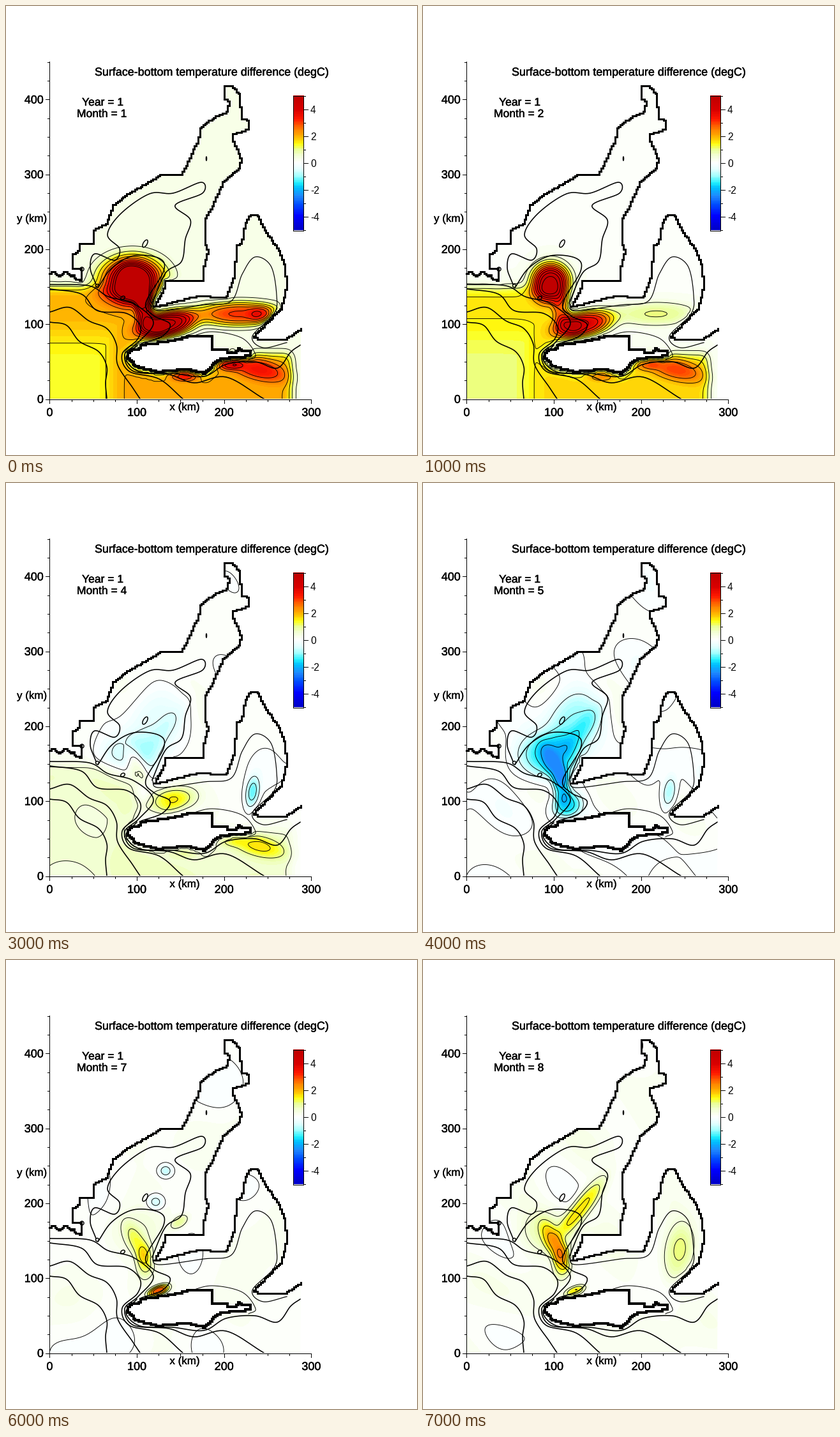
Recreate the animation shown at these times as a matplotlib script. Size 644 by 703 pixels, loop 8 s.

```python
import matplotlib.pyplot as plt
import numpy as np
from matplotlib.animation import FuncAnimation
from matplotlib.colors import LinearSegmentedColormap
from matplotlib.patches import Ellipse, Polygon
from matplotlib.patheffects import Normal, Stroke

W, H, DPI = 644, 703, 100
PT = 72 / DPI
LEFT, BASE = 68.5, 615.5
KX, KY = 410 / 300, 469 / 400          # pixels per km
plt.rcParams["font.family"] = "Liberation Sans"

# ---- key points of the coast, in stage pixels ----
SHELF_COAST = [(x, 419.5 + 4 * np.sin(x / 3.1)) for x in range(69, 108, 3)]
SHELF_COAST += [(109, 428), (118, 430), (118, 411)]
GULF_COAST = [(103, 411), (103, 390), (115, 383), (115, 372), (137, 372),
              (137, 350), (158, 341), (168, 311), (190, 295), (243, 264),
              (276, 263), (286, 242), (302, 208), (303, 191), (327, 174),
              (348, 165), (349, 150), (341, 143), (341, 125), (354, 125),
              (365, 137), (370, 176), (381, 179), (381, 193), (356, 201),
              (356, 212), (369, 240), (366, 254), (340, 277), (325, 311),
              (313, 333), (313, 375), (317, 385), (310, 408), (309, 431),
              (248, 431), (248, 442), (233, 471)]
EAST_COAST = [(246, 468), (271, 461), (301, 454), (345, 456), (357, 425),
              (362, 375), (370, 370), (372, 351), (378, 333), (383, 327),
              (393, 327), (409, 356), (428, 384), (438, 410), (440, 441),
              (431, 474), (388, 518), (393, 521), (440, 521), (461, 506)]
ISLAND = [(193, 540), (211, 536), (211, 531), (250, 526), (290, 517), (322, 516),
          (323, 537), (347, 537), (349, 543), (361, 543), (364, 536), (370, 541),
          (382, 541), (384, 548), (340, 552), (330, 556), (318, 570), (311, 575),
          (283, 568), (240, 573), (204, 564), (192, 550), (193, 540)]

# ---- patches of water: x, y, two radii, tilt, {month: strength} ----
GULF_PATCHES = [
    (200, 432, 29, 29, 0, {1: 2.4, 2: 5}),                           # mouth
    (198, 428, 50, 36, 0, {1: 4.2, 5: -1.7, 7: 0.3, 8: 0.6}),
    (207, 446, 38, 14, 62, {1: 1, 3: 2.6, 5: -1, 7: 0.8, 8: 1.4}),
    (217, 474, 14, 26, 0, {1: 3.2, 2: 2, 3: 0.8, 5: -1.4, 7: 0.9, 8: 1.2}),
    (250, 385, 52, 14, -52, {5: -0.4, 8: 1.5}),                      # upper arm
    (240, 370, 50, 42, -50, {5: -1}),
    (272, 410, 16, 9, -35, {7: 0.9}),
    (250, 330, 11, 10, 0, {7: -0.8}),
    (234, 379, 13, 12, 0, {7: -0.8}),
    (386, 485, 11, 26, 8, {3: -1.5, 5: -0.9}),                       # east gulf
    (400, 460, 24, 46, 10, {3: -0.3, 8: 0.9})]
STRAIT_PATCHES = [
    (254, 498, 42, 20, -12, {1: 4.8, 2: 3.8, 3: 3}),
    (226, 505, 24, 20, -30, {1: 1.5, 2: 1.5, 3: 0.8, 5: -1.6}),
    (238, 519, 18, 8, -25, {7: 3, 8: 1.6}),
    (365, 482, 70, 19, 0, {1: 2.8, 2: 0.9}),
    (400, 483, 19, 13, 0, {1: 0.9}),
    (395, 568, 45, 17, 15, {1: 1.4, 2: 1.3, 3: 2}),                  # south shelf
    (350, 560, 20, 10, 0, {1: 1.7, 2: 0.9, 3: 0.8}),
    (280, 578, 22, 9, 0, {1: 1.5, 2: 0.8, 3: 0.8})]

# month: background, open ocean, rise towards the shelf, south shelf
WATER = {1: (0.25, 1.05, 0.7, 1.8), 2: (0.12, 0.95, 0.5, 1.55),
         3: (0.12, 0.85, 0.25, 1.05), 5: (0.03, 0, 0, 0),
         7: (0.1, 0, 0, 0), 8: (0.12, 0, 0, 0)}

STOPS = [(-5, "#0000c8"), (-4, "#0000ff"), (-3.1, "#0050ff"), (-2.5, "#2088ff"),
         (-1.9, "#00bfff"), (-1.5, "#20f0ff"), (-1, "#a0ffff"), (-0.5, "#e4ffff"),
         (0, "#ffffff"), (0.5, "#f4ffdc"), (1, "#eaff98"), (1.4, "#ffff10"),
         (2, "#ffb000"), (2.5, "#ff8000"), (3.3, "#ff1800"), (4, "#d80000"),
         (5, "#c00000")]
cmap = LinearSegmentedColormap.from_list(
    "diff", [((v + 5) / 10, c) for v, c in STOPS], N=80)


def stair(pts):
    """Follow the points along the edges of the 2 km model cells."""
    cx, cy = 2 * KX, 2 * KY
    out = []
    for a, b in zip(pts, pts[1:]):
        n = int(max(abs(b[0] - a[0]), abs(b[1] - a[1]))) + 1
        for t in np.linspace(0, 1, n):
            x = LEFT + round((a[0] + t * (b[0] - a[0]) - LEFT) / cx) * cx
            y = BASE + round((a[1] + t * (b[1] - a[1]) - BASE) / cy) * cy
            if out and x != out[-1][0] and y != out[-1][1]:
                out.append((x, out[-1][1]))
            if not out or (x, y) != out[-1]:
                out.append((x, y))
    return out


def smooth(pts):
    """Catmull-Rom curve through the points."""
    p = np.array(pts, float)
    p = np.vstack([2 * p[0] - p[1], p, 2 * p[-1] - p[-2]])
    t = np.linspace(0, 1, 12)[:, None]
    return np.vstack([
        b + t / 2 * (c - a + t * (2 * a - 5 * b + 4 * c - d
                                  + t * (3 * (b - c) + d - a)))
        for a, b, c, d in zip(p, p[1:], p[2:], p[3:])])


shore = stair(SHELF_COAST + GULF_COAST + EAST_COAST)
island = stair(ISLAND)

# ---- temperature difference on a grid ----
XS, YS = np.arange(69, 463, 2.0), np.arange(120, 618, 2.0)
X, Y = np.meshgrid(XS, YS)
coast_dist = np.full(X.shape, 1e3)
for px, py in shore + island:
    coast_dist = np.minimum(coast_dist, np.hypot(X - px, Y - py))
near_coast = 1 - np.exp(-coast_dist / 4)


def step(d):
    return 0.5 + 0.5 * np.tanh(d / 2)


def patch(x, y, rx, ry, tilt):
    a = np.radians(tilt)
    u = (X - x) * np.cos(a) + (Y - y) * np.sin(a)
    v = (Y - y) * np.cos(a) - (X - x) * np.sin(a)
    return np.exp(-((u / rx) ** 2 + (v / ry) ** 2) ** 1.4)


def ripple(month):
    """Weak large-scale waviness that bends the zero lines."""
    rng = np.random.default_rng(month)
    total = 0
    for _ in range(5):
        a, phase = rng.uniform(0, 2 * np.pi, 2)
        k = 2 * np.pi / rng.uniform(90, 190)
        total = total + np.sin(k * (X * np.cos(a) + Y * np.sin(a)) + phase)
    return 0.05 * total


def field(month):
    tint, ocean, rise, south = WATER[month]
    shelf = np.maximum(step((515 - Y) / 14), step((X - 165) / 8))
    east = step((X - 185) / 9)
    open_sea = (ocean + rise * shelf) * (1 - east) + south * east
    mask = np.maximum(step((Y - 440) / 5) * step((208 - X) / 6),
                      step((Y - 545) / 5) * step((447 - X) / 4))
    f = open_sea * mask
    for *shape, strength in GULF_PATCHES + STRAIT_PATCHES:
        if month in strength:
            f = f + strength[month] * patch(*shape)
    return np.clip(f, -2.45, 5.4) * near_coast + tint + ripple(month) * (month > 3)


fields = {m: field(m) for m in WATER}
fields[4] = (fields[3] + fields[5]) / 2
fields[6] = (fields[5] + fields[7]) / 2

# ---- fixed parts ----
fig = plt.figure(figsize=(W / DPI, H / DPI), dpi=DPI, facecolor="white")
ax = fig.add_axes([0, 0, 1, 1])
ax.set(xlim=(0, W), ylim=(H, 0))
ax.axis("off")
ax.autoscale(False)


def curve(pts, px=1.6):
    x, y = smooth(pts).T
    ax.plot(x, y, color="black", lw=px * PT, zorder=4, clip_path=sea)


def seg(x0, y0, x1, y1):
    ax.plot([x0, x1], [y0, y1], color="black", lw=PT, zorder=8, aa=False)


def label(x, y, s, px=18, ha="left", bold=0.45):
    fx = [Stroke(linewidth=bold * PT, foreground="black"), Normal()]
    return ax.text(x, y, s, fontsize=px * PT, ha=ha, va="baseline", zorder=9,
                   path_effects=fx if bold else None)


sea = Polygon(shore + [(461, 615), (69, 615)], fc="none", ec="none")
ax.add_patch(sea)
ax.plot(*zip(*shore), color="black", lw=2.6 * PT, zorder=6, aa=False)
ax.add_patch(Polygon(island, fc="white", ec="black", lw=2.3 * PT, zorder=6,
                     aa=False))

# depth lines, from the open ocean inwards
curve([(69, 495), (95, 500), (115, 525), (145, 541), (158, 565), (156, 590),
       (158, 615)])
curve([(69, 479), (100, 472), (130, 493), (158, 505), (173, 530), (175, 562),
       (198, 597), (210, 615)])
curve([(69, 443), (118, 451), (143, 477), (188, 481), (210, 500), (206, 522),
       (182, 545), (193, 572), (240, 584), (277, 615)])
curve([(69, 436), (130, 438), (160, 455), (200, 466), (231, 495), (208, 526),
       (186, 546), (200, 572), (255, 577), (295, 590), (345, 581), (404, 615)])
curve([(205, 531), (188, 552), (210, 573), (260, 575), (310, 580), (345, 561),
       (390, 557), (425, 567), (446, 542), (461, 531)])
curve([(144, 441), (166, 410), (200, 391), (240, 395), (247, 415), (219, 465),
       (232, 485), (257, 498), (245, 517), (212, 529)])
curve([(141, 436), (132, 410), (139, 388), (170, 398), (178, 380), (159, 358),
       (180, 325), (225, 294), (262, 293), (306, 276), (308, 293), (265, 312),
       (289, 335), (281, 365), (275, 400), (250, 418), (229, 465)])
curve([(229, 465), (240, 477), (310, 468), (353, 462), (370, 420), (390, 393),
       (415, 407), (424, 452), (420, 482), (386, 517), (403, 535), (440, 527)], 1.2)
curve([(285, 519), (323, 510), (370, 520), (391, 546), (380, 554)], 1)
for x, y, w, h, tilt in [(218, 372, 6, 13, 30), (183, 457, 7, 5, -30),
                         (119, 412, 6, 6, 0), (143, 438, 5, 5, 0),
                         (314, 239, 1, 6, 0)]:
    ax.add_patch(Ellipse((x, y), w, h, angle=tilt, fc="none", ec="black",
                         lw=1.5 * PT, zorder=7))

# axes
seg(LEFT, 87, LEFT, BASE)
seg(LEFT, BASE, 478, BASE)
for km in range(0, 451, 25):
    size = 3 if km % 100 else 6
    y = BASE - km * KY
    seg(LEFT, y, LEFT - size, y)
    if km % 100 == 0:
        label(59, y + 6, str(km), ha="right")
    if km <= 300:
        x = LEFT + km * KX
        seg(x, BASE, x, BASE + size)
        if km % 100 == 0:
            label(x, 642, str(km), ha="center")
label(280, 633, "x (km)", 17, "center", 0.3)
label(17, 338, "y (km)", 17, "left", 0.3)
label(139, 109, "Surface-bottom temperature difference (degC)", 17.9)
label(119, 156, "Year = 1", 17.5)
month_text = label(111, 174, "", 17.5)

# colour bar
ax.imshow(np.linspace(5, -5, 80)[:, None], cmap=cmap, vmin=-5, vmax=5,
          extent=(450, 467, 351.5, 140.5), aspect="auto", interpolation="nearest")
for x in (450.5, 466.5):
    seg(x, 140.5, x, 351.5)
for y in (140.5, 351.5):
    seg(450.5, y, 466.5, y)
for v in range(-5, 6):
    y = 246 - 21 * v
    seg(466.5, y, 469 if v % 2 else 473, y)
    if v % 2 == 0:
        label(477, y + 5.5, str(v), 15.5, bold=0)

# ---- monthly parts ----
EXTENT = (XS[0] - 1, XS[-1] + 1, YS[-1] + 1, YS[0] - 1)
LEVELS = np.arange(-2.5, 5.1, 0.5)
moving = []


def update(i):
    month = i + 1
    while moving:
        moving.pop().remove()
    month_text.set_text(f"Month = {month}")
    data = fields[month]
    img = ax.imshow(data, cmap=cmap, vmin=-5, vmax=5, extent=EXTENT, aspect="auto",
                    interpolation="bilinear", zorder=1)
    lines = ax.contour(XS, YS, data, LEVELS, colors="black", linestyles="solid",
                       linewidths=0.9 * PT, zorder=3)
    for art in (img, lines):
        art.set_clip_path(sea)
        moving.append(art)
    return moving + [month_text]


anim = FuncAnimation(fig, update, frames=8, interval=1000, repeat=True,
                     repeat_delay=0, blit=False)
plt.show()
```
